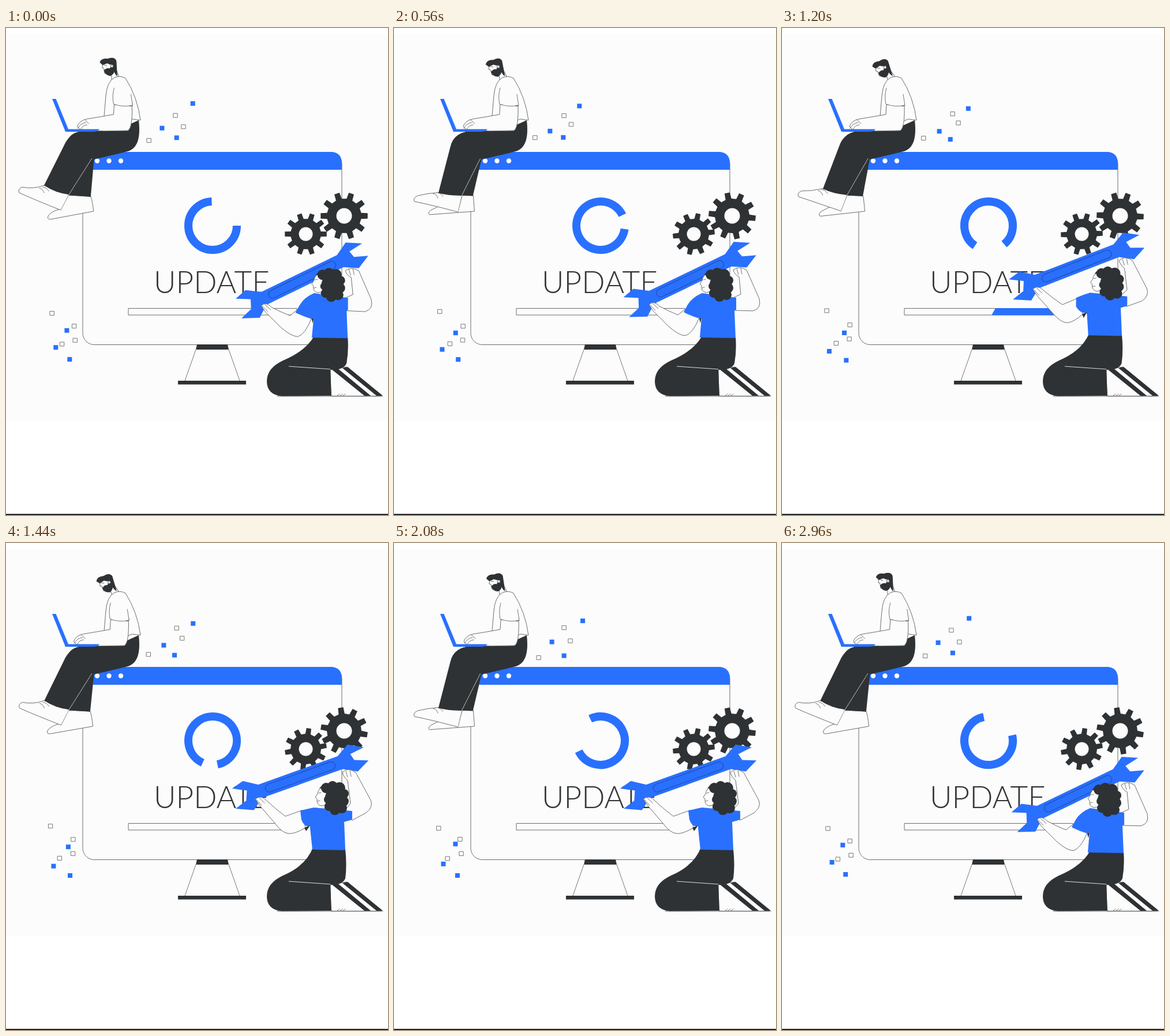
An HTML page that plays this animation: 662x845 px, repeating every 3.04 s.

```html
<!DOCTYPE html>
<html lang="en">
<head>
<meta charset="utf-8">
<title>Update</title>
<style>
html, body { margin: 0; width: 100%; height: 100%; overflow: hidden; background: #fff }
svg { display: block; width: 662px; height: 845px }
.line { fill: none; stroke: #777; stroke-width: 1; stroke-linejoin: round; stroke-linecap: round }
.skin { fill: #fcfcfc; stroke: #6b6d6e; stroke-width: 1; stroke-linejoin: round }
.blue { fill: #2970ff }
.dark { fill: #2e3234 }
text { font: 300 53px Lato, "Open Sans", sans-serif; fill: #333638; text-anchor: middle }
</style>
</head>
<body>
<svg id="stage" viewBox="0 0 662 845"></svg>
<script>
const LOOP = 3040, STEP = 80, TAU = 2 * Math.PI;
const stage = document.getElementById('stage');

const path = (cls, d) => `<path class="${cls}" d="${d}"/>`;
const circle = (cls, x, y, r) => `<circle class="${cls}" cx="${x}" cy="${y}" r="${r}"/>`;
const rect = (cls, x, y, w, h, rx = 0) =>
  `<rect class="${cls}" x="${x}" y="${y}" width="${w}" height="${h}" rx="${rx}"/>`;
const group = (move, ...parts) => `<g transform="${move}">${parts.join('')}</g>`;
const wave = (t, peak, period = LOOP) => Math.cos(TAU * (t - peak) / period);

// Blend two paths that have the same commands
function mix(a, b, k) {
  const ends = b.match(/-?[\d.]+/g);
  let i = 0;
  return a.replace(/-?[\d.]+/g, n => (+n + (ends[i++] - n) * k).toFixed(2));
}

// Drifting squares: blue?, centre x, sine, cosine, centre y, sine, cosine
const squares = [
  [1, 324.2, -2.9, -.5, 135.2, 2, -4.2], [0, 294.8, .4, -1.1, 149.5, 1.9, 2.2],
  [0, 306.5, .3, 1.2, 168.5, -2.6, 2.8], [1, 272, -1.1, -1.6, 175.2, 4.6, -1.5],
  [1, 294, -1.5, 1.7, 192.7, -2.1, -2.3], [0, 247.7, -3.5, .1, 194.6, -5, .5],
  [0, 78.5, .5, 1.3, 493.3, -2.4, 1.7], [0, 117.2, 2.4, 1.1, 515.7, 1.2, 1.6],
  [1, 106.6, .7, -1.2, 525.7, 4.1, -.9], [0, 95, 1.3, 2.2, 547.7, -.1, .8],
  [0, 118, .5, 1.9, 540.3, .7, 1.5], [1, 84.5, -1.9, 1.8, 557.3, 1.8, -3.1],
  [1, 110.6, .8, -.3, 576, -.5, -1.1]
];

function drift(t) {
  const s = Math.sin(TAU * t / LOOP), c = Math.cos(TAU * t / LOOP);
  return squares.map(([blue, x, xs, xc, y, ys, yc]) => {
    const px = x + xs * s + xc * c, py = y + ys * s + yc * c;
    return blue ? rect('blue', px - 4, py - 4, 8, 8) : rect('line', px - 3.5, py - 3.5, 7, 7);
  }).join('');
}

function gear(x, y, outer, root, hole, turn) {
  let d = '';
  for (let i = 0; i < 10; i++)
    for (const [r, off] of [[root, -10], [outer, -6.5], [outer, 6.5], [root, 10]]) {
      const a = (i * 36 + off + turn) * TAU / 360;
      d += `${d ? 'L' : 'M'}${x + r * Math.sin(a)} ${y - r * Math.cos(a)}`;
    }
  return path('dark', d + 'Z') + `<circle cx="${x}" cy="${y}" r="${hole}" fill="#fcfcfc"/>`;
}

function spinner(t) {
  const end = 360 * t / LOOP - 2, start = end + 62 + 30 * wave(t, 0, LOOP / 3);
  const at = deg => {
    const a = deg * TAU / 360;
    return `${358 + 42 * Math.sin(a)} ${343 - 42 * Math.cos(a)}`;
  };
  return `<path d="M${at(start)}A42 42 0 1 1 ${at(end)}" fill="none" stroke="#2970ff" stroke-width="14"/>`;
}

function progress(t) {
  const x = 308 + .7 * (t % (LOOP / 2) - 960);
  return rect('skin', 212, 486.5, 292, 11.5) +
    `<g clip-path="url(#bar)">${path('blue', `M${x + 4} 486l-7 12.5h-110l7-12.5Z`)}</g>`;
}

function monitor(t) {
  return rect('skin', 133, 215.5, 449, 334, 20) +
    path('blue', 'M133 246V235Q133 215 153 215H562Q582 215 582 235V246Z') +
    [158, 178.5, 199].map(x => `<circle cx="${x}" cy="230.5" r="4.2" fill="#fff"/>`).join('') +
    path('dark', 'M331 549H384L386 558H329Z') + path('line', 'M329 558L310 612M386 558L405 612') +
    rect('dark', 298, 612, 118, 6.5) + spinner(t) + '<text x="356.5" y="460">UPDATE</text>' + progress(t);
}

function man(t) {
  const lean = .5 - .5 * wave(t, -280);
  const near = .5 - .5 * wave(t, 0, LOOP / 2), far = .5 - .5 * wave(t, 60, LOOP / 2);
  const phase = t % (LOOP / 2);

  const farLeg = path('skin', mix(
      'M106 290L92 315Q80 318 74 325Q70 333 78 332L152 318Q150 300 147 292Z',
      'M86 290L82 302Q72 309 60 313Q53 318 56 321L135 318Q134 300 134 290Z', far)) +
    path('dark', mix('M153 222L147 293L106 290L138 215Z', 'M153 222L133 291L86 289L118 215Z', far));
  const nearLeg = path('skin', mix(
      'M66 273Q48 280 28 276Q20 279 23 286Q52 299 95 316L109 289Z',
      'M78 288Q60 288 43 294Q34 299 38 304Q70 309 114 320L120 291Z', near)) +
    path('line', mix('M58 278Q64 279 66 286M64 276Q71 277 74 283', 'M70 289Q76 290 78 297M77 287Q83 288 87 294', near)) +
    path('dark', mix('M155 226L150 226L109 289Q85 286 66 273L100 205Q110 181 134 179L160 179Z',
      'M155 226L151 226L119 291Q98 292 79 289L97 207Q102 180 134 179L160 179Z', near)) +
    `<path d="${mix('M149 226L109 289L95 316', 'M150 226L119 291L114 320', near)}" fill="none" stroke="#bbb"/>`;
  const legs = phase > 800 && phase < 1200 ? nearLeg + farLeg : farLeg + nearLeg;

  const head = group(`rotate(${-15 * lean} 190 88)`,
    path('skin', 'M169 60L167 68L170 70L171 78L183 82L183 94L197 88L192 74L190 58Z'),
    path('dark', 'M163 59Q166 51 177 53Q189 49 192 57L193 84Q188 80 187 72L186 64L180 63L176 61L168 64Z'),
    path('dark', 'M170 73Q175 68 180 70L183 65L189 70Q189 80 181 83Q172 82 170 73Z'),
    circle('skin', 184, 66, 2.2), path('line', 'M171 64L175 65'));
  const arm = group(`translate(${-7 * lean} 0)`,
    path('skin', 'M188 133L187 150Q165 154 140 158Q127 161 124 171L130 177Q170 180 212 178Q220 173 219 135Z'),
    path('line', 'M125 174Q130 165 139 164M130 176Q134 168 141 168M137 159L144 166'),
    path('dark', 'M214 136L220 130L220 135Z'),
    `<path d="M193 94Q184 110 187 132Q204 138 220 134Q217 108 207 92Z" fill="#fcfcfc"/>`,
    path('line', 'M188 104Q184 118 187 132Q204 138 220 134L217 115'));

  return legs +
    path('dark', 'M230 160C233 186 230 206 214 213Q205 216 152 228L105 200Q110 180 134 179L190 178Z') +
    head + path('skin', 'M188 86Q175 93 173 118L170 153L190 170L219 158L233 160Q228 120 207 87Q198 82 188 86Z') + arm +
    path('blue', 'M80 123H86.500L108 175.500H162Q159 180 150 180H103Z');
}

function wrench(u) {
  return group(`translate(${513.5 - 4 * u} ${439 - 37 * u}) rotate(${-26.5 + 7.5 * u})`,
    path('blue', 'M-73 -12L-96 -27L-118 -21L-95 -9L-102 7L-124 14L-95 27L-75 12H74L97 25L121 13L98 4L95 -8L121 -11L96 -25L73 -12Z'),
    '<rect x="-64" y="-7" width="128" height="14" rx="7" fill="none" stroke="#24489f"/>');
}

function woman(k) {
  const armRight = mix(
    'M588 420Q598 412 611 420L633 470Q637 487 622 491L588 490L588 468L601 462L598 432Q590 428 588 420Z',
    'M583 398Q592 388 606 398L632 446Q637 458 624 468L600 481L588 462L597 452L592 412Q585 406 583 398Z', k);
  const armLeft = mix(
    'M442 480Q450 472 460 483Q475 491 492 498L506 487L529 503Q518 530 505 534Q494 534 476 518L449 491Z',
    'M432 444Q442 436 452 447Q468 462 484 474L512 464L519 494Q500 505 490 504Q478 503 466 486L441 457Z', k);
  const fingers = mix('M444 481L453 490M448 478L458 487M594 418L597 428M601 417L603 427',
    'M434 445L443 455M439 442L448 451M589 396L592 406M596 395L598 405', k);
  const shirt = mix(
    'M534 460Q517 467 509 480L502 493Q515 500 529 504L533 502L530 537L592 538L590 490L593 489L593 468Q592 461 582 459Z',
    'M534 459Q524 461 510 464Q512 480 517 494L527 491L527 495L531 532L588 533L586 484L600 480Q600 465 590 457Z', k);
  const trousers = mix(
    'M534 534L592 536Q594 560 590 582Q585 594 562 593L564 638L478 639Q452 636 452 613Q452 590 480 577Q520 560 534 534Z',
    'M532 528L588 531Q591 560 588 582Q583 594 562 593L564 638L478 639Q452 636 452 613Q452 590 480 577Q520 560 532 528Z', k);
  const curls = [[549, 428, 9], [560, 425, 9], [572, 428, 10], [580, 438, 8], [579, 451, 9],
    [576, 463, 9], [564, 466, 9], [554, 460, 8], [552, 448, 7], [565, 445, 18]];

  return path('skin', armRight) + path('skin', armLeft) + path('line', fingers) +
    path('skin', 'M562 593L590 588L651 638.500H563Z') +
    path('dark', 'M564 592L574 590L632 638H621ZM583 590L592 588L653 638H642Z') +
    path('dark', trousers) + '<path d="M490 587L562 592" stroke="#ddd"/>' +
    path('line', 'M470 639H653M574 638L578 635M579 638L583 635M584 638L588 635') +
    path('blue', shirt) +
    `<path d="${mix('M529 504L533 502L531 512Z', 'M517 494L527 490L520 500Z', k)}" fill="#2e3234"/>` +
    group(`translate(${6 * k} ${-3 * k})`,
      path('skin', 'M547 424Q535 428 534 438L530 444L533 447Q532 457 540 459L547 458L546 464L562 464V430Z'),
      path('line', 'M536 437L540 436M534 451L538 450'),
      path('dark', 'M537 429Q543 419 556 420L555 434Q548 426 537 429Z'),
      ...curls.map(c => circle('dark', ...c)));
}

function draw(t) {
  const lift = .5 + .5 * wave(t, 1760), turn = 18 + 360 * t / LOOP;
  stage.innerHTML = '<clipPath id="bar"><rect x="212" y="486" width="292" height="12.5"/></clipPath>' +
    '<rect y="11" width="662" height="671" fill="#fcfcfc"/><rect y="843" width="662" height="2" fill="#222"/>' +
    monitor(t) + drift(t) + man(t) +
    gear(586, 326, 41, 30, 13.5, -turn) + gear(519.5, 357.5, 36.5, 26.5, 12, turn) +
    wrench(lift) + woman((lift - .1) / .8);
}

let shown = -1;
const begun = performance.now();
function tick() {
  const t = Math.floor((performance.now() - begun) % LOOP / STEP) * STEP;
  if (t !== shown) draw(shown = t);
  requestAnimationFrame(tick);
}
tick();
</script>
</body>
</html>
```
